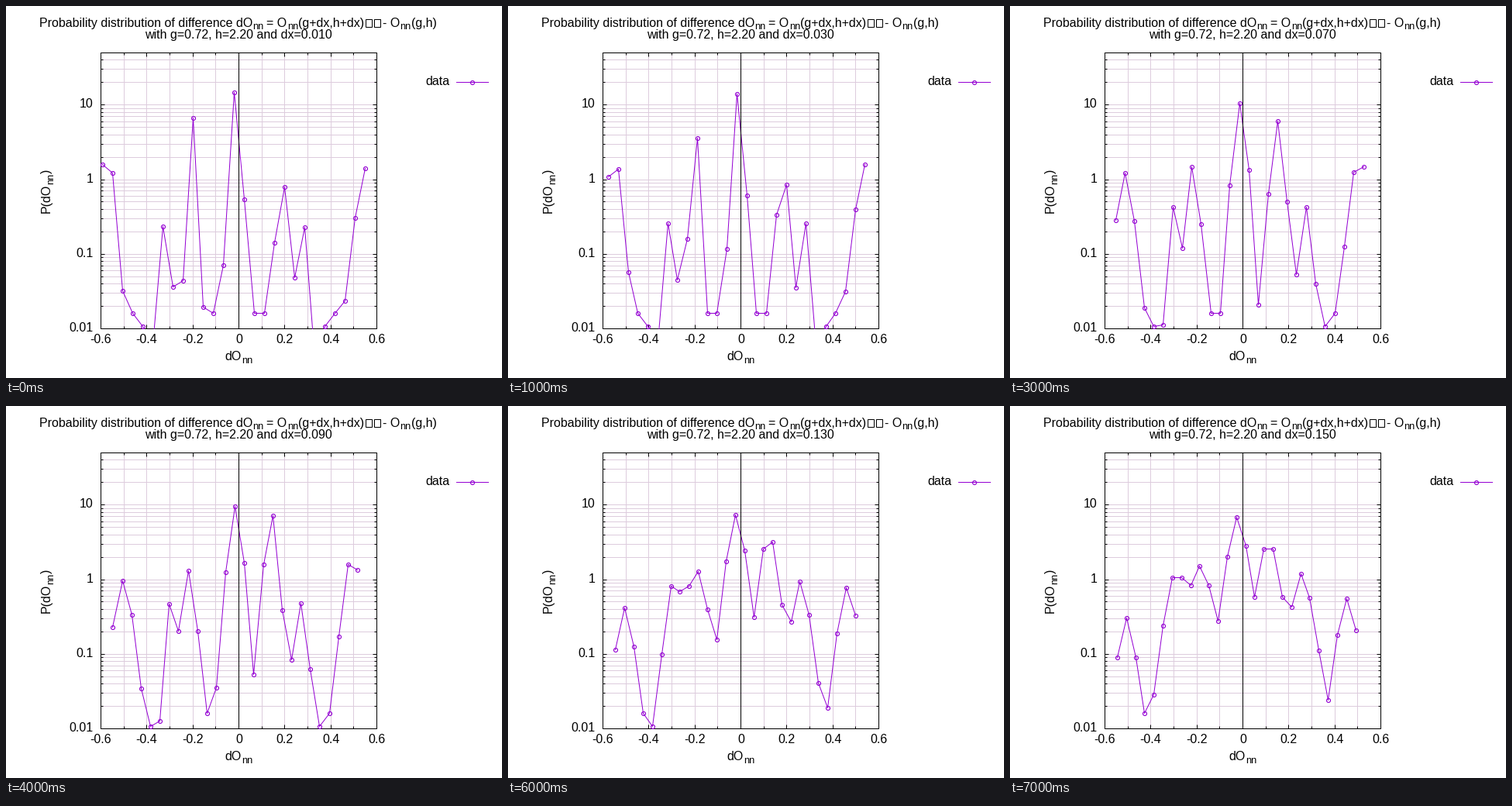
These frames come from a looping animation (640x480 px, 8 s). A matplotlib script:

```python
import numpy as np
import matplotlib.pyplot as plt
from matplotlib.animation import FuncAnimation
from matplotlib.markers import MarkerStyle
from matplotlib.patches import Rectangle
from matplotlib.transforms import Affine2D

W, H, DPI = 640, 480, 100
PX = 72 / DPI                                  # points per pixel
LEFT, RIGHT, TOP, BOTTOM = 122, 478, 60, 416
PURPLE, GRID = "#9400d3", "#ddccdd"
BINS = np.arange(27)
STEPS = 8

plt.rcParams["font.family"] = "Liberation Sans"
fig = plt.figure(figsize=(W / DPI, H / DPI), dpi=DPI, facecolor="white")
ax = fig.add_axes([0, 0, 1, 1])
ax.set_xlim(0, W)
ax.set_ylim(H, 0)
ax.axis("off")


def col(v):
    return round(LEFT + (v + 0.6) / 1.2 * (RIGHT - LEFT))


def row(p):
    share = np.log10(p / 0.01) / np.log10(50 / 0.01)
    return round(BOTTOM - share * (BOTTOM - TOP))


def label(x, y, s, size=16, **kw):
    return ax.text(x, y, s, fontsize=size * PX, color="black", va="baseline", **kw)


def hline(y, a, b, color="black", z=3):
    ax.hlines(y, a, b, colors=color, linewidth=PX, zorder=z)


def vline(x, a, b, color="black", z=3):
    ax.vlines(x, a, b, colors=color, linewidth=PX, zorder=z)


def box(x, y, w, h):
    ax.add_patch(Rectangle((x, y), w, h, fill=False, ec="black", lw=PX, zorder=3))


def draw_frame():
    for k in range(-6, 7):
        x, n = col(k / 10), 5 if k % 2 == 0 else 3
        vline(x, TOP, BOTTOM, GRID, 1)
        vline(x, BOTTOM - n, BOTTOM)
        vline(x, TOP, TOP + n)
        if k % 2 == 0:
            label(x + 0.5, 435, f"{k / 10:g}", ha="center")
    for e in range(-2, 2):
        decade = 10.0 ** e
        for m in range(1, 10 if e < 1 else 6):
            y, n = row(m * decade), 5 if m == 1 else 3
            hline(y, LEFT, RIGHT, GRID, 1)
            hline(y, LEFT, LEFT + n)
            hline(y, RIGHT - n, RIGHT)
        label(113, row(decade) + 4, f"{decade:g}", ha="right")
    box(LEFT, TOP, RIGHT - LEFT, BOTTOM - TOP)
    vline(col(0), TOP, BOTTOM, z=6)


def draw_labels():
    label(43, 27, "Probability distribution of difference dO")
    label(336.4, 27, "= O")
    label(377, 27, "(g+dx,h+dx)")
    label(486.3, 27, "- O")
    label(522.7, 27, "(g,h)")
    for x in (317.8, 362.7, 508.5):
        label(x, 30, "nn", 12.8)
    for x in (464, 475):                       # missing-glyph boxes
        box(x, 17, 8, 10)

    label(282.7, 457, "dO")
    label(304, 461, "nn", 12.8)
    up = dict(rotation=90, rotation_mode="anchor", ha="left")
    label(57, 267, "P(dO", **up)
    label(61, 229.7, "nn", 12.8, **up)
    label(57, 215.5, ")", **up)
    label(572, 102, "data", ha="right")


# Each peak at the start, middle and end: centre bin, top row, steepness.
KEYS = [0, 4, 7]
PEAKS = [
    ((0.45, 1.1, 1.0), (174, 223, 273), (100, 54, 51)),
    ((6.2, 6.3, 6.5), (273, 236, 206), (125, 115, 42)),
    ((8.95, 8.0, 9.0), (141, 212, 206), (230, 78, 25)),
    ((13.15, 13.05, 13.1), (100, 128, 142), (190, 80, 45)),
    ((17.85, 16.8, 16.5), (227, 132, 169), (100, 100, 42)),
    ((20.0, 19.95, 20.1), (285, 253, 215), (170, 80, 38)),
    ((26.1, 25.45, 25.05), (207, 185, 247), (57, 64, 45)),
]


def ease(t, values):
    k = 0 if t < KEYS[1] else 1
    u = (t - KEYS[k]) / (KEYS[k + 1] - KEYS[k])
    return values[k] + (values[k + 1] - values[k]) * u * u * (3 - 2 * u)


def curve(t):
    first = 138 - 14 * max(0, 1 - t / 5) ** 2
    last = 463 - 2.5 * t
    # A low floor that dips out of view every eight bins.
    y = 396 + 60 * np.cos(np.pi * (BINS - 5) / 8) ** 16
    for peak in PEAKS:
        centre, top, steep = (ease(t, values) for values in peak)
        y = np.minimum(y, top + steep * np.abs(BINS - centre) ** 1.5)
    return np.round(first + (last - first) * BINS / BINS[-1]), np.round(y)


draw_frame()
draw_labels()

# The marker is nudged half a pixel so that it sits on the line's centre.
ring = MarkerStyle("o", transform=Affine2D().translate(0.1, -0.1))
line_style = dict(color=PURPLE, lw=PX, zorder=4)
dot_style = dict(ls="none", marker=ring, ms=5 * PX, mew=1.15 * PX,
                 mfc="none", mec=PURPLE, zorder=5)
ax.plot([581, 622], [98, 98], **line_style)
ax.plot([601], [98], **dot_style)

line, = ax.plot([], [], **line_style)
line.set_clip_path(Rectangle((LEFT, TOP), RIGHT - LEFT, BOTTOM - TOP + 1,
                             transform=ax.transData))
dots, = ax.plot([], [], **dot_style)
subtitle = label(299.7, 42, "", ha="center")


def update(i):
    x, y = curve(i)
    line.set_data(x + 0.5, y + 0.5)
    seen = y <= BOTTOM
    dots.set_data(x[seen], y[seen])
    subtitle.set_text(f"with g=0.72, h=2.20 and dx={0.01 + 0.02 * i:.3f}")
    return line, dots, subtitle


anim = FuncAnimation(fig, update, frames=STEPS, interval=1000, repeat=True)
plt.show()
```
